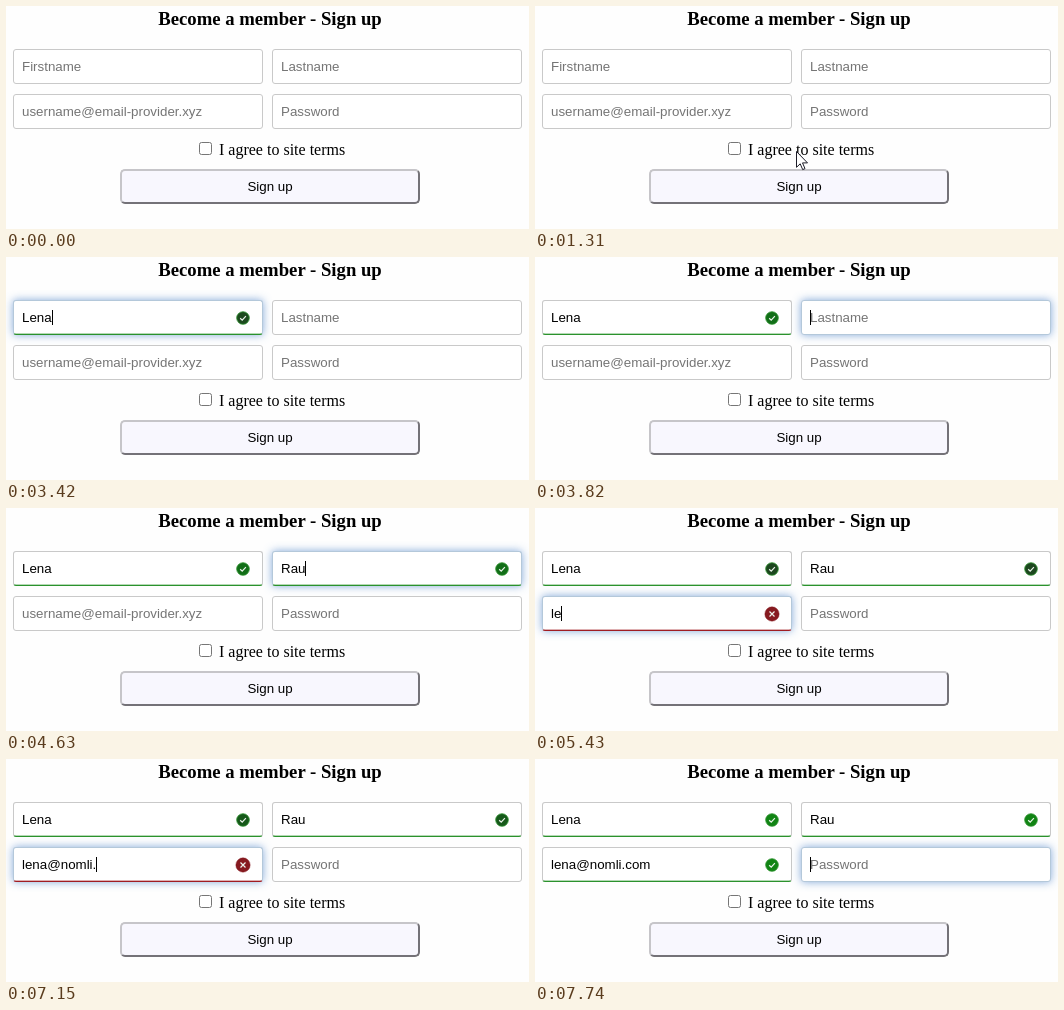
Recreate the animation shown at these times as an HTML page. Size 523 px wide and 223 px high, loop 8 s.

```html
<!DOCTYPE html>
<html lang="en">
<head>
<meta charset="utf-8">
<title>Sign up form</title>
<style>
html, body { margin: 0; width: 100%; height: 100%; overflow: hidden; background: #fefefe; }
#stage { position: relative; width: 523px; height: 223px; overflow: hidden; color: #000; }
#stage > * { position: absolute; box-sizing: border-box; white-space: pre; }
h3, .label { margin: 0; font-family: "Liberation Serif", "Times New Roman", serif; }
h3 { left: 0; top: 2px; width: 528px; text-align: center; font-size: 18.72px; line-height: 21px; }
.label { left: 213px; top: 135px; font-size: 16px; line-height: 17px; }
.box { left: 193px; top: 136px; width: 13px; height: 13px; border: 1px solid #767676; border-radius: 2.5px; background: #fff; }
.field, .button { height: 35px; font: 13.333px/15px "Liberation Sans", Arial, sans-serif; }
.field { width: 250px; padding: 9px 8px; border: 1px solid #c9c9c9; border-radius: 3px; background: #fff; }
.field.empty { color: #757575; }
.field.focus { border-color: #b4c8da; box-shadow: 0 0 8px rgba(75, 130, 200, .68); }
.field::after { content: ""; position: absolute; left: 0; right: 0; bottom: 0; height: 1px; }
.field.valid { border-bottom-color: #2b922d; }
.field.valid::after { background: rgba(43, 146, 45, .35); }
.field.invalid { border-bottom-color: #a01c22; }
.field.invalid::after { background: rgba(160, 28, 34, .35); }
.caret { display: inline-block; width: 1px; height: 15px; margin-right: -1px; vertical-align: top; background: #000; }
.field svg { position: absolute; left: 221px; top: 9px; width: 16px; height: 16px; }
.field path { fill: none; stroke: #eef4ee; stroke-width: 1.2; }
.button {
  left: 114px; top: 163px; width: 300px; padding: 8px 0; text-align: center;
  border: 2px solid; border-color: #c6c5c9 #747278 #747278 #c6c5c9; border-radius: 5px; background: #f8f7fe;
}
#cursor { left: 0; top: 0; width: 13px; height: 20px; }
</style>
</head>
<body>
<div id="stage">
  <h3>Become a member - Sign up</h3>
  <div class="box"></div>
  <div class="label">I agree to site terms</div>
  <div class="button">Sign up</div>
</div>
<script>
const LOOP = 8000;
const stage = document.getElementById('stage');
const SVG = 'http://www.w3.org/2000/svg';

// keys: [time, number of characters typed by then]
const specs = [
  { x: 7, y: 43, hint: 'Firstname', text: 'Lena', from: 2420, to: 3820,
    keys: [[2820, 1], [2920, 2], [3320, 3], [3420, 4]] },
  { x: 266, y: 43, hint: 'Lastname', text: 'Rau', from: 3820, to: 4940,
    keys: [[4330, 1], [4430, 2], [4630, 3]] },
  { x: 7, y: 88, hint: 'username@email-provider.xyz', text: 'lena@nomli.com', from: 4940, to: 7740,
    keys: [[5230, 1], [5430, 2], [5530, 3], [5740, 4], [6150, 5], [6450, 6], [6650, 7],
           [6750, 8], [6850, 10], [7150, 11], [7250, 12], [7340, 13], [7540, 14]],
    check: s => /^\w+@\w+(\.\w+)*$/.test(s) },
  { x: 266, y: 88, hint: 'Password', text: '', from: 7740, to: LOOP, keys: [] }
];
const greens = [[0, '#1c4a1e'], [3820, '#126e18'], [4940, '#1d471f'], [6650, '#16581a'], [7540, '#118414']];

function add(parent, tag, attrs, ns) {
  const el = ns ? document.createElementNS(ns, tag) : document.createElement(tag);
  for (const k in attrs) el.setAttribute(k, attrs[k]);
  return parent.appendChild(el);
}

// Value of the last step that has begun at time t
function stepAt(steps, t, start) {
  let value = start;
  for (const [time, v] of steps) if (t >= time) value = v;
  return value;
}

const fields = specs.map(spec => {
  const el = add(stage, 'div', { style: `left:${spec.x}px;top:${spec.y}px` });
  const value = add(el, 'span');
  const caret = add(el, 'span', { class: 'caret' });
  const hint = add(el, 'span');
  hint.textContent = spec.hint;
  const icon = add(el, 'svg', { viewBox: '-8 -8 16 16' }, SVG);
  const disc = add(icon, 'circle', {}, SVG);
  const mark = add(icon, 'path', {}, SVG);
  return { ...spec, el, value, caret, hint, icon, disc, mark };
});

const cursor = add(stage, 'svg', { id: 'cursor', viewBox: '0 0 13 20' }, SVG);
add(cursor, 'path', {
  d: 'M.5 .5V16.3L4.2 12.8L6.7 18.6L9 17.6L6.5 11.9H11.5Z',
  fill: '#fff', stroke: '#1c1c28', 'stroke-width': 1
}, SVG);

function drawField(f, t) {
  const text = f.text.slice(0, stepAt(f.keys, t, 0));
  const focus = t >= f.from && t < f.to;
  const ok = !f.check || f.check(text);
  const state = !text ? 'empty' : ok ? 'valid' : 'invalid';
  f.el.className = `field ${state}${focus ? ' focus' : ''}`;
  f.value.textContent = text;
  f.caret.style.display = focus ? '' : 'none';
  f.hint.style.display = text ? 'none' : '';
  f.icon.style.display = text ? '' : 'none';
  f.disc.setAttribute('r', ok ? 6.3 : 7.2);
  f.disc.setAttribute('fill', ok ? stepAt(greens, t) : '#861a20');
  f.disc.setAttribute('stroke', ok ? '#2b922d' : '#861a20');
  f.disc.setAttribute('stroke-width', ok ? .8 : .4);
  f.mark.setAttribute('d', ok ? 'M-2.8 .2L-.8 2.1L2.9 -1.8' : 'M-2.5 -2.5L2.5 2.5M2.5 -2.5L-2.5 2.5');
}

// Pointer advances in 100 ms hops
function hop(t, start, count, a, b) {
  const k = Math.min(count, Math.floor((t - start) / 100) + 1) / count;
  return a.map((v, i) => Math.round(v + (b[i] - v) * k));
}

function pointerAt(t) {
  if (t < 410) return null;
  if (t < 1110) return hop(t, 410, 6, [304, 223], [284, 178]);
  if (t < 1720) return hop(t, 1110, 3, [284, 178], [261, 145]);
  return t >= 1920 && t < 2020 ? [189, 78] : null;
}

function draw() {
  const t = performance.now() % LOOP;
  fields.forEach(f => drawField(f, t));
  const p = pointerAt(t);
  cursor.style.display = p ? '' : 'none';
  if (p) cursor.style.transform = `translate(${p[0]}px,${p[1]}px)`;
  requestAnimationFrame(draw);
}
draw();
</script>
</body>
</html>
```
